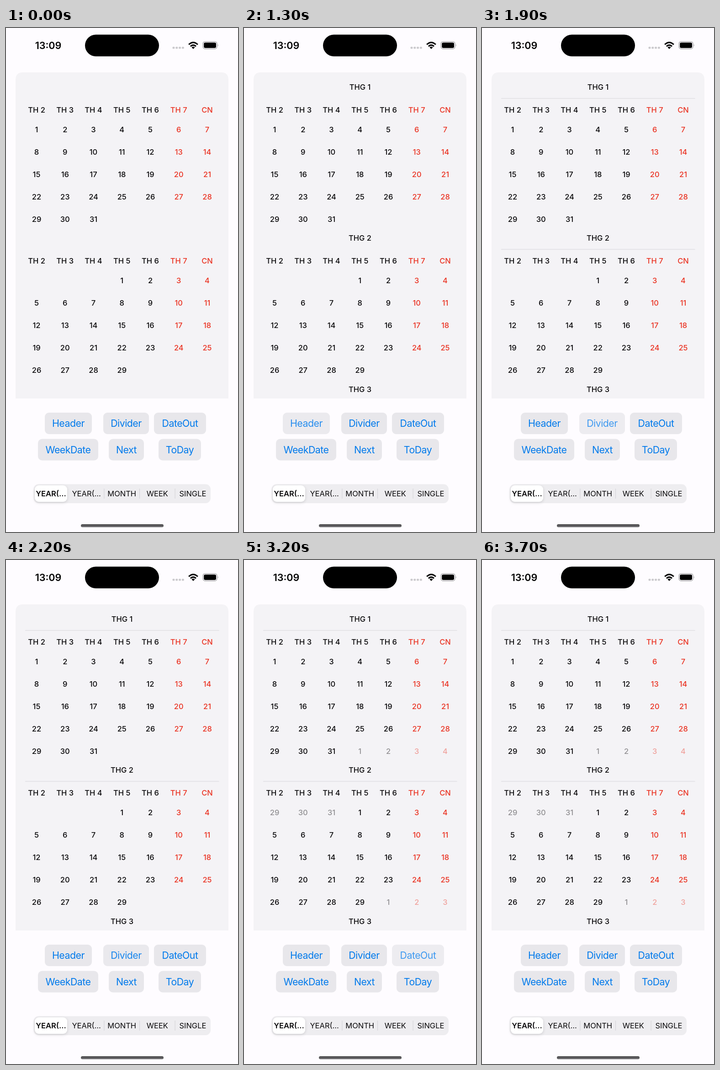
An HTML page for the animation above (8 s loop, 508 by 1102 pixels).

```html
<!DOCTYPE html>
<html lang="vi">
<head>
<meta charset="utf-8">
<title>Calendar</title>
<style>
html, body { margin: 0; width: 100%; height: 100%; overflow: hidden; background: #fefcff; }
svg { display: block; width: 508px; height: 1102px; }
text { font: 500 16.5px Inter, "Noto Sans", sans-serif; text-anchor: middle; fill: #0a090b; }
.weekend { fill: #ea3323; }
.faded { opacity: .42; }
.clock { font-weight: 600; font-size: 21.5px; fill: #000; }
.rule { stroke: #d6d5d9; stroke-width: 1.2; }
.button rect { fill: #e8e7eb; }
.button text { font-weight: 400; font-size: 21.3px; letter-spacing: -.5px; fill: #007aeb; }
.tab { font-weight: 400; }
.tab.on { font-weight: 600; }
.thumb { filter: drop-shadow(0 2px 3px #0002); }

#titles { animation: titles 8s step-end infinite; }
#rules { animation: rules 8s step-end infinite; }
#outside { animation: outside 8s step-end infinite; }
@keyframes titles { 0% { opacity: 0; } 13.75%, 100% { opacity: 1; } }
@keyframes rules { 0% { opacity: 0; } 23.75%, 100% { opacity: 1; } }
@keyframes outside { 0% { opacity: 0; } 40%, 100% { opacity: 1; } }

.pressed { animation: press 8s steps(5, end) infinite; }
@keyframes press { 0% { opacity: .75; } 6.25%, 100% { opacity: 1; } }
</style>
</head>
<body>
<svg id="stage" viewBox="0 0 508 1102">
  <defs>
    <linearGradient id="bar" x2="0" y2="1">
      <stop stop-color="#454446"/><stop offset="1" stop-color="#747376"/>
    </linearGradient>
  </defs>

  <text class="clock" x="92.5" y="46">13:09</text>
  <rect x="173" y="14.5" width="162" height="47.5" rx="23.75"/>
  <g fill="#cbcacd">
    <rect x="364.5" y="41" width="5" height="4.6" rx="1.8"/>
    <rect x="371.3" y="41" width="5" height="4.6" rx="1.8"/>
    <rect x="378.1" y="41" width="5" height="4.6" rx="1.8"/>
    <rect x="384.9" y="41" width="5" height="4.6" rx="1.8"/>
  </g>
  <g fill="none" stroke="#000" stroke-width="3.2">
    <path d="M400.2 36.2Q410 27 419.8 36.2"/>
    <path d="M404 40.2Q410 34.6 416 40.2"/>
  </g>
  <path d="M406.4 42.2Q410 39.4 413.6 42.2L410 46Z"/>
  <rect x="431.1" y="29.6" width="31" height="16.2" rx="5" fill="none" stroke="#a3a2a5" stroke-width="1.3"/>
  <rect x="433.2" y="31.7" width="26.8" height="12" rx="3.2"/>
  <path d="M463.8 35.2Q466 37.7 463.8 40.4Z" fill="#a3a2a5"/>

  <path d="M21 810V113Q21 97 37 97H471Q487 97 487 113V810Z" fill="#f4f3f6"/>
  <g id="days"></g>
  <g id="titles"></g>
  <g id="rules"></g>
  <g id="outside"></g>
  <g id="buttons"></g>

  <rect x="60.5" y="997.5" width="387.5" height="41.5" rx="11" fill="#eeedf0"/>
  <rect class="thumb" x="63" y="1000" width="71" height="36" rx="9" fill="#fff"/>
  <g id="tabs"></g>
  <rect x="164" y="1085" width="181" height="6.6" rx="3.3" fill="url(#bar)"/>
</svg>
<script>
const add = (parent, tag, attrs, content = "") => {
  const el = document.createElementNS("http://www.w3.org/2000/svg", tag);
  for (const key in attrs) el.setAttribute(key, attrs[key]);
  el.textContent = content;
  return parent.appendChild(el);
};
const layer = id => document.getElementById(id);
const label = (parent, x, middle, content, cls = "") =>
  add(parent, "text", { x, y: middle + 6, class: cls }, content);

const columnX = column => 67 + 62.25 * column;
const weekend = column => column > 4 ? "weekend" : "";

// A month starts at its first weekday column and fills five weeks.
function month(index, first, length, previousLength) {
  const top = 330 * index;
  ["TH 2", "TH 3", "TH 4", "TH 5", "TH 6", "TH 7", "CN"].forEach((name, c) =>
    label(layer("days"), columnX(c), 179 + top, name, weekend(c)));
  add(layer("rules"), "path", { d: `M42 ${154 + top}H466.5`, class: "rule" });

  for (let i = 0; i < 35; i++) {
    const column = i % 7, day = i - first + 1;
    const inside = day > 0 && day <= length;
    const shown = day < 1 ? day + previousLength : inside ? day : day - length;
    label(layer(inside ? "days" : "outside"), columnX(column),
      221.5 + top + 49.15 * Math.floor(i / 7), shown,
      weekend(column) + (inside ? "" : " faded"));
  }
}
month(0, 0, 31, 31);
month(1, 3, 29, 31);
[129, 459, 789.5].forEach((y, i) => label(layer("titles"), 254, y, "THG " + (i + 1)));

function button(name, x, y, width, pressAt) {
  const g = add(layer("buttons"), "g", { class: "button" });
  add(g, "rect", { x, y, width, height: 47, rx: 9 });
  add(g, "text", { x: x + width / 2, y: y + 31 }, name);
  if (pressAt) {
    g.classList.add("pressed");
    g.style.animationDelay = pressAt + "ms";
  }
}
button("Header", 85, 841, 103, 1100);
button("Divider", 213, 841, 100, 1900);
button("DateOut", 324, 841, 114, 3200);
button("WeekDate", 70, 898.5, 132);
button("Next", 225, 898.5, 77);
button("ToDay", 334, 898.5, 93);

["YEAR(…", "YEAR(…", "MONTH", "WEEK", "SINGLE"].forEach((name, i) => {
  label(layer("tabs"), 98.5 + 77.6 * i, 1018, name, i ? "tab" : "tab on");
  if (i > 1) add(layer("tabs"), "path", { d: `M${59.7 + 77.6 * i} 1007V1029`, class: "rule" });
});
</script>
</body>
</html>
```
